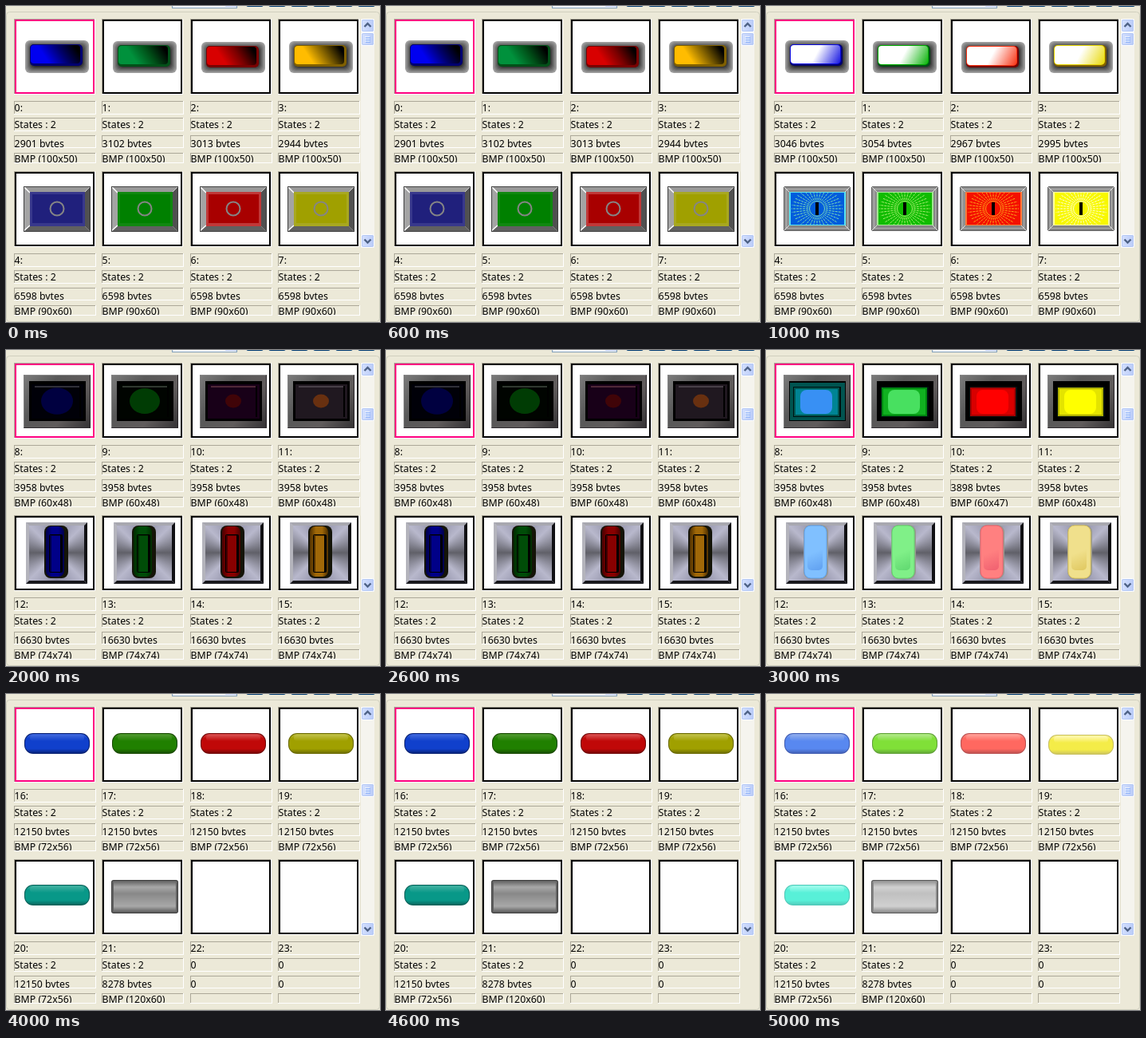
These frames come from a looping animation (469 px wide and 396 px high, 6000 ms). An HTML page with a canvas:

```html
<!DOCTYPE html>
<html>
<head>
<meta charset="utf-8">
<style>
html, body { margin: 0; width: 469px; height: 396px; overflow: hidden; background: #ece9d8; }
canvas { display: block; }
</style>
</head>
<body>
<canvas id="stage" width="469" height="396"></canvas>
<script>
const ctx = document.getElementById('stage').getContext('2d');
const COLUMNS = [10, 120, 231, 341], ROWS = [16, 207];
const PAGE_MS = 1000;

function rect(x, y, w, h, fill) {
  ctx.fillStyle = fill;
  ctx.fillRect(x, y, w, h);
}
function rounded(x, y, w, h, r, fill, stroke) {
  ctx.beginPath();
  ctx.roundRect(x, y, w, h, r);
  if (fill) { ctx.fillStyle = fill; ctx.fill(); }
  if (stroke) { ctx.strokeStyle = stroke; ctx.lineWidth = 1; ctx.stroke(); }
}
function ellipse(x, y, rx, ry, fill) {
  ctx.beginPath();
  ctx.ellipse(x, y, rx, ry, 0, 0, 7);
  ctx.fillStyle = fill;
  ctx.fill();
}
function poly(fill, ...points) {
  ctx.beginPath();
  for (let i = 0; i < points.length; i += 2) ctx.lineTo(points[i], points[i + 1]);
  ctx.fillStyle = fill;
  ctx.fill();
}
function line(color, width, ...points) {
  ctx.beginPath();
  for (let i = 0; i < points.length; i += 2) ctx.lineTo(points[i], points[i + 1]);
  ctx.strokeStyle = color;
  ctx.lineWidth = width;
  ctx.stroke();
}
function addStops(g, colors) {
  colors.forEach((c, i) => g.addColorStop(i / (colors.length - 1), c));
  return g;
}
function gradient(x0, y0, x1, y1, ...colors) {
  return addStops(ctx.createLinearGradient(x0, y0, x1, y1), colors);
}
function conic(x, y, ...colors) {
  return addStops(ctx.createConicGradient(0, x, y), colors);
}
function clipped(x, y, w, h, draw) {
  ctx.save();
  ctx.beginPath();
  ctx.rect(x, y, w, h);
  ctx.clip();
  draw();
  ctx.restore();
}
// Four mitred sides of a bevelled frame of thickness t
function bevel(x, y, w, h, t, top, left, bottom, right) {
  const r = x + w, b = y + h;
  poly(top, x, y, r, y, r - t, y + t, x + t, y + t);
  poly(left, x, y, x + t, y + t, x + t, b - t, x, b);
  poly(bottom, x, b, x + t, b - t, r - t, b - t, r, b);
  poly(right, r, y, r, b, r - t, b - t, r - t, y + t);
}

// Button pictures, in coordinates of their thumbnail
function haloButton(on, i) {
  const lit = ['#0808e0', '#00b000', '#f83010', '#e8d800'][i];
  const dim = ['#0000f0', '#00913c', '#d80000', '#ffbc00'][i];
  const edge = ['#000070', '#005018', '#780000', '#806000'][i];
  const y = [0, 1, 2, 1][i];
  for (let k = 0; k < 9; k++) {
    const v = 160 - k * 15;
    rounded(14 + k, 27 + y + k, 80 - 2 * k, 41 - y - 2 * k, 6, `rgb(${v},${v},${v})`);
  }
  rounded(20, 32 + y, 66, 27, 5, edge);
  const fill = on ? gradient(22, 30, 82, 62, '#fff', '#fff', lit)
                  : gradient(24, 60, 72, 28, dim, dim, edge, '#000');
  rounded(20, 32 + y, 64, 25, 5, on ? lit : edge);
  rounded(21, 33 + y, 62, 23, 4, fill);
}

function framedPlate(i) {
  const fill = ['#20207c', '#008000', '#a80000', '#a0a000'][i];
  const edge = ['#38388c', '#108810', '#c03838', '#a8a820'][i];
  bevel(12, 19, 84, 57, 8, '#999', '#a4a4a4', '#606060', '#505050');
  line('#fff', 1.5, 12, 19, 20, 27);
  line('#fff', 1.5, 12, 75, 20, 68);
  line('#c8c8c8', 1, 96, 19, 88, 27);
  ctx.strokeStyle = '#404040';
  ctx.lineWidth = 1;
  ctx.strokeRect(12.5, 19.5, 83, 56);
  rect(20, 26, 69, 43, edge);
  rect(23, 29, 63, 36, fill);
  ctx.beginPath();
  ctx.arc(54, 47, 8.5, 0, 7);
  ctx.strokeStyle = '#858585';
  ctx.lineWidth = 2;
  ctx.stroke();
}

function sunburst(i) {
  const fill = ['#005cdc', '#10bc00', '#f41000', '#f8f800'][i];
  const ray = ['#7cd8b8', '#a4ec70', '#ffa018', '#ffffd8'][i];
  const edge = ['#58e0f0', '#a0e890', '#ff7838', '#ffffa0'][i];
  bevel(12, 19, 84, 56, 8, '#8c8c8c', '#909090', '#848484', '#848484');
  ctx.lineWidth = 1;
  ctx.strokeStyle = '#606060';
  ctx.strokeRect(12.5, 19.5, 83, 55);
  ctx.strokeStyle = '#b0b0b0';
  ctx.strokeRect(15.5, 22.5, 77, 49);
  for (const [x, y, dx, dy] of [[12, 19, 8, 8], [96, 19, -8, 8], [12, 75, 8, -8], [96, 75, -8, -8]])
    line('#e0e0e0', 1, x, y, x + dx, y + dy);
  rect(19, 26, 71, 42, edge);
  rect(21, 27, 67, 40, fill);
  clipped(20, 27, 69, 40, () => {
    ctx.setLineDash([3, 1]);
    for (let k = 0; k < 36; k++) {
      const a = k * Math.PI / 18, c = Math.cos(a), s = Math.sin(a);
      line(ray, 1, 54 + 11 * c, 47 + 11 * s, 54 + 32 * c, 47 + 26 * s);
    }
    ctx.setLineDash([]);
    ctx.beginPath();
    ctx.arc(54, 47, 9.5, 0, 7);
    ctx.strokeStyle = ray;
    ctx.stroke();
  });
  rect(52, 39, 4, 16, '#000');
}

function lamp(on, i) {
  rect(12, 15, 84, 67, gradient(12, 15, 96, 81, '#7c7c7c', '#585858', '#605c5c', '#343234'));
  bevel(12, 15, 84, 67, 1, '#888', '#808080', '#302c30', '#282428');
  rect(19, 23, 71, 50, '#000');
  if (on) {
    const rim = ['#005450', '#008810', '#a80000', '#b0b000'][i];
    const mid = ['#008494', '#10b020', '#d80000', '#e4e400'][i];
    const core = ['#3890f4', '#48e060', '#ff0000', '#ffff00'][i];
    if (i === 0) rect(20, 25, 69, 47, rim);
    rect(24, 30, 60, 38, '#001010');
    rect(25, 31, 57, 36, rim);
    rect(27, 33, 53, 32, mid);
    rounded(33, 34, 40, 30, 8, core);
  } else {
    const back = ['#000008', '#000400', '#180018', '#201820'][i];
    const color = ['#000040', '#003c04', '#400408', '#683010'][i];
    const r = [20, 19, 10, 10][i];
    rect(22, 27, 65, 43, back);
    ellipse(54, 48, r, r * .84, color);
    rect(26, 29, 56, 2, ['#303038', '#303830', '#502838', '#484048'][i]);
    rect(82, 29, 2, 39, '#000');
  }
}

function steelPill(on, i) {
  const dark = ['#000088', '#004c08', '#880000', '#a06808'][i];
  const deep = ['#000048', '#002c00', '#480000', '#503000'][i];
  const light = ['#80c0ff', '#80f088', '#ff8080', '#f0e08c'][i];
  const tint = ['#60a0f0', '#60d870', '#f06070', '#e0c860'][i];
  const quarter = ['#606068', '#b8b8cc', '#8888a0', '#b8b8cc'];
  rect(15, 9, 77, 77, conic(53, 47, ...quarter, ...quarter, quarter[0]));
  bevel(15, 9, 77, 77, 4, '#a8a8b0', '#b4b4bc', '#18181c', '#101014');
  if (on) {
    rounded(37, 12, 31, 68, 9, '#98988c');
    rounded(38, 13, 28, 66, 8, light, tint);
    rounded(42, 23, 19, 46, 5, gradient(42, 23, 61, 69, light, light, tint));
  } else {
    rounded(38, 13, 30, 66, 8, '#141408');
    rounded(40, 14, 23, 63, 7, gradient(40, 0, 63, 0, deep, dark, dark, deep));
    rounded(44, 24, 17, 48, 2, '#000');
    rect(45, 25, 13, 46, deep);
    rect(47, 26, 11, 45, dark);
  }
}

function capsule(on, i) {
  const body = (on ? ['#5888f0', '#80e038', '#ff6860', '#f4ec48', '#58f0d8']
                   : ['#1040cc', '#208000', '#c00808', '#a0a000', '#089888'])[i];
  const shine = (on ? ['#90acec', '#b0e888', '#ffa098', '#fff8b0', '#a0fcec']
                    : ['#4068dc', '#509830', '#d85050', '#c0c048', '#40b0a0'])[i];
  const edge = (on ? ['#405cb0', '#60a038', '#b85050', '#c8c060', '#50c8b8']
                   : ['#082070', '#184800', '#700808', '#686800', '#086058'])[i];
  const y = i === 4 ? 32 : i === 3 && on ? 35 : 33;
  const h = i === 3 && on ? 25 : 26;
  rounded(13, y, 82, h, 11, edge);
  rounded(14, y + 1, 80, h - 2, 10, gradient(0, y, 0, y + h, shine, body, body, body, edge));
  rounded(20, y + 2, 68, 8, 4, gradient(0, y + 2, 0, y + 10, shine, body));
}

function metalBar(on) {
  const edge = on ? '#585858' : '#404040';
  rounded(12, 26, 84, 42, 3, edge);
  const stops = on ? ['#909090', '#d0d0d0', '#c0c0c0', '#c8c8c8', '#d0d0d0', '#888']
                   : ['#606060', '#a8a8a8', '#888', '#989898', '#a8a8a8', '#585858'];
  rounded(13, 27, 82, 40, 3, gradient(0, 27, 0, 67, ...stops));
  rect(13, 29, 2, 36, on ? '#888' : '#606060');
  rect(93, 29, 2, 36, on ? '#888' : '#606060');
}

function picture(index, on) {
  const i = index % 4;
  if (index < 4) haloButton(on, i);
  else if (index < 8) on ? sunburst(i) : framedPlate(i);
  else if (index < 12) lamp(on, i);
  else if (index < 16) steelPill(on, i);
  else if (index < 21) capsule(on, index - 16);
  else if (index === 21) metalBar(on);
}

function details(index, on) {
  if (index > 21) return ['0', '0', ''];
  const sizes = on ? [3046, 3054, 2967, 2995] : [2901, 3102, 3013, 2944];
  const shorter = index === 10 && on;
  const [bytes, format] =
    index < 4 ? [sizes[index], '100x50'] :
    index < 8 ? [6598, '90x60'] :
    index < 12 ? [shorter ? 3898 : 3958, shorter ? '60x47' : '60x48'] :
    index < 16 ? [16630, '74x74'] :
    index < 21 ? [12150, '72x56'] : [8278, '120x60'];
  return ['States : 2', bytes + ' bytes', `BMP (${format})`];
}

function sunken(y, w, h, fill) {
  rect(0, y, w, h, '#fff');
  rect(0, y, w - 1, h - 1, '#aca899');
  rect(1, y + 1, w - 2, h - 2, fill);
}

function label(text, y, h, baseline) {
  sunken(y, 103, h, '#ece9d8');
  clipped(0, y, 102, h - 1, () => {
    ctx.fillStyle = '#000';
    ctx.font = '12.3px "Noto Sans", sans-serif';
    ctx.fillText(text, .6, baseline);
  });
}

function cell(index, slot, on) {
  ctx.save();
  ctx.translate(COLUMNS[slot % 4], ROWS[slot >> 2]);
  sunken(0, 102, 95, slot ? '#000' : '#ff0080');
  rect(3, 3, 96, 89, '#fff');
  picture(index, on);
  const [states, bytes, format] = details(index, on);
  label(index + ':', 103, 17, 116);
  label(states, 124, 17, 137);
  label(bytes, 146, 16, 161);
  label(format, 168, 13, 180);
  ctx.restore();
}

function scrollPart(y, h) {
  rounded(445.5, y + .5, 16, h - 1, 2, gradient(446, 0, 462, 0, '#d4e0fe', '#b8caf8'), '#fff');
  rounded(446.5, y + 1.5, 14, h - 3, 2, null, '#b4c8f4');
}

function scrollBar(thumbY) {
  rect(445, 16, 17, 287, '#f5f4ee');
  scrollPart(16, 17);
  scrollPart(286, 17);
  line('#4d6185', 2.4, 449.5, 26, 453.5, 22, 457.5, 26);
  line('#4d6185', 2.4, 449.5, 292.5, 453.5, 296.5, 457.5, 292.5);
  scrollPart(thumbY, 17);
  for (let k = 0; k < 4; k++) {
    rect(450, thumbY + 5 + 2 * k, 6, 1, '#eef4fe');
    rect(451, thumbY + 6 + 2 * k, 6, 1, '#8cb0f8');
  }
}

function toolbar() {
  rect(208, 0, 82, 3, '#7f9db9');
  rect(209, 0, 80, 2, '#fff');
  rect(275, 0, 14, 1, '#c0d0f8');
  for (let k = 0; k < 6; k++) rounded(301 + 28 * k, -10, 22, 11, 3, '#003c74');
}

function drawPage(page) {
  const on = page % 2 === 1, group = page >> 1;
  rect(0, 0, 469, 396, '#ece9d8');
  toolbar();
  rounded(.5, 7.5, 468, 388, 4, null, '#d0d0bf');
  for (let slot = 0; slot < 8; slot++) cell(group * 8 + slot, slot, on);
  scrollBar([33, 72, 112][group]);
}

let shown = -1;
function tick() {
  const page = Math.floor(performance.now() / PAGE_MS) % 6;
  if (page !== shown) drawPage(shown = page);
  requestAnimationFrame(tick);
}
tick();
</script>
</body>
</html>
```
